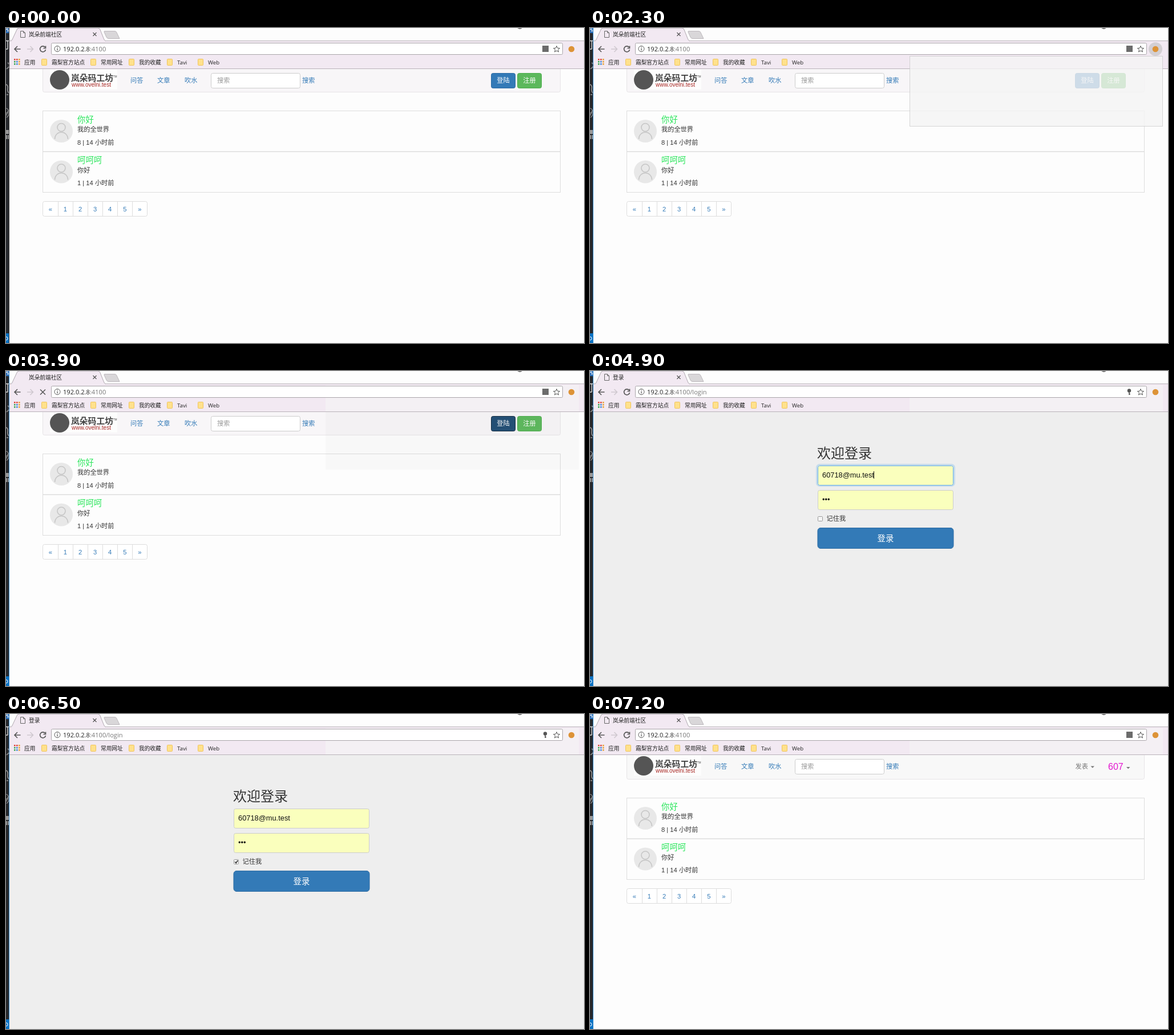
Animation of 1013 by 553 pixels, one loop 8 s. Source, as an HTML page:

```html
<!DOCTYPE html>
<html lang="zh">
<head>
<meta charset="utf-8">
<style>
  html, body { margin: 0; width: 100%; height: 100%; overflow: hidden; background: #fdfdfd; }
  svg { display: block; width: 1013px; height: 553px; }
  text { font-family: "Open Sans", "Noto Sans CJK SC", "Noto Sans CJK JP", sans-serif; white-space: pre; }
  #home text, #login text { font-family: "Liberation Sans", Arial, "Noto Sans CJK SC", "Noto Sans CJK JP", sans-serif; }
</style>
</head>
<body>
<svg id="stage" viewBox="0 0 1013 553"></svg>
<script>
const LINK = '#337ab7', INK = '#333', BAR = '#f2e9f2';
const text = (x, y, str, size = 11.2, fill = INK, more = '') =>
  `<text x="${x}" y="${y}" font-size="${size}" fill="${fill}" ${more}>${str}</text>`;
const rect = (x, y, w, h, fill, stroke = 'none', r = 0, more = '') =>
  `<rect x="${x}" y="${y}" width="${w}" height="${h}" rx="${r}" fill="${fill}" stroke="${stroke}" ${more}/>`;
const path = (d, stroke, width = 1, fill = 'none') =>
  `<path d="${d}" stroke="${stroke}" stroke-width="${width}" fill="${fill}"/>`;
const circle = (x, y, r, fill, stroke = 'none', more = '') =>
  `<circle cx="${x}" cy="${y}" r="${r}" fill="${fill}" stroke="${stroke}" ${more}/>`;
const group = (id, ...parts) => `<g id="${id}">${parts.join('')}</g>`;
const MID = 'text-anchor="middle"';

// Editor window peeking out on the left
const editorStrip = () => [
  rect(0, 0, 6, 553, '#26282c'),
  rect(0, 0, 5, 9, '#2d6fb8'), path('M0 2h4M2 5h3', '#fff', 1.5),
  path('M0 22.5h5M3 23v14M0 37h3', '#ddd', 1.3),
  path('M1 72l2-2a5 5 0 0 0 0-9', '#999', 1.5),
  path('M0 99q4 2 3 7t2 8M1 117h3', '#999', 1.5),
  path('M0 141q4 0 5 6t-4 10M0 149h5M0 154l4-9', '#999', 1.2),
  rect(0, 179, 5, 7, '#999'), rect(0, 188, 2, 7, '#999'), rect(3, 188, 2, 7, '#999'),
  rect(0, 536, 5, 17, '#0a72c4'), circle(0, 545, 3, 'none', '#fff'),
  rect(5, 0, 1, 553, '#444', 'none', 0, 'id="edge"')
].join('');

const folder = (x, name) => rect(x + .5, 54.5, 9, 11, '#ffe18c', '#efc45c', 1) + text(x + 18, 64, name, 9.7, '#222');
const appColors = ['#e0463c', '#e0463c', '#e8a33a', '#3aa655', '#4285d8', '#e8a33a', '#3aa655', '#4285d8', '#e8a33a'];

const browser = () => [
  rect(6, 0, 1007, 22, '#fdfdfd'),
  rect(6, 22, 1007, 49, BAR),
  rect(560, 25, 444, 46, '#f4f0f4', 'none', 0, 'id="barTint"'),
  path('M6 22.5H1013', '#b9b2b9'),
  path('M8 23Q11 22 12 18L19 3Q20 0 23 0H161Q164 0 165 3L171 18Q172 22 175 23', '#b0a8b0', 1, BAR),
  path('M173 5.5H191Q193 5.5 194 8L199 18.5H180Q177 18.5 176 16L172 7Q171.5 5.5 173 5.5Z', '#bdb8bd', 1, '#d9d7d9'),
  circle(900.5, -3, 5, '#777'),
  group('pageIcon', path('M25.5 5.5H30.5L33.5 8.5V16.5H25.5ZM30.5 5.5V8.5H33.5', '#666')),
  text(40, 15, '', 9.7, '#222', 'id="title"'),
  path('M152.5 8l6 6m0-6l-6 6', '#555', 1.2),
  path('M25.5 37H15.5M20 32l-5 5l5 5', '#555', 1.6),
  path('M37 37H47M42.5 32l5 5l-5 5', '#cfc8cf', 1.6),
  group('reload', path('M68.5 33.7A5 5 0 1 0 69.5 38M69.5 31.5V35.5H65.5', '#555', 1.6)),
  group('stop', path('M60 32.5l9 9m0-9l-9 9', '#555', 1.5)),
  rect(79.5, 26.5, 896, 20, '#fff', '#aaa5aa', 2),
  circle(90, 36.5, 5, 'none', '#555'), path('M90 35.5v4M90 33v1.3', '#555', 1.2),
  text(100, 40.5, '192.0.2.8<tspan id="port" fill="#777"></tspan>', 11.1, '#222'),
  group('translate', rect(940, 31, 11, 11, '#6b6b6b')),
  group('key', circle(945, 34.5, 3.2, '#555'), path('M945 36v6M945 40.5h2', '#555', 1.6)),
  path('M965 31.5l1.5 3.7l4 .3l-3 2.6l1 3.9l-3.5-2.1l-3.5 2.1l1-3.9l-3-2.6l4-.3Z', '#555'),
  circle(991, 37, 12, '#d3cfd3', 'none', 'id="press"'),
  circle(991, 37, 5.3, '#dd9337'),
  ...appColors.map((c, i) => rect(14 + i % 3 * 4, 54 + (i / 3 | 0) * 4, 2.6, 2.6, c)),
  text(32, 64, '应用', 9.7, '#222'),
  folder(62, '霜梨官方站点'), folder(148, '常用网址'), folder(215, '我的收藏'), folder(282, 'Tavi'), folder(336, 'Web'),
  path('M6 71.5H1013', '#b9b2b9')
].join('');

const post = (y, title, body, views) => [
  rect(64.5, y + .5, 907, 71.5, 'none', '#ddd'),
  circle(97, y + 36, 20, '#e8e8e8'),
  circle(97, y + 29.5, 7, 'none', '#c6c6c6', 'stroke-width="1.6"'),
  path(`M85.5 ${y + 50}C86 ${y + 34} 108 ${y + 34} 108.5 ${y + 50}`, '#c6c6c6', 1.6),
  text(125, y + 20.5, title, 14.4, '#2be65c'),
  text(125, y + 37, body),
  text(125, y + 59.5, views + ' | 14 小时前')
].join('');

const button = (id, x, name, fill, stroke) =>
  rect(x + .5, 79.5, 42, 26, fill, stroke, 3, `id="${id}"`) + text(x + 21.5, 96, name, 11.2, '#fff', MID + ' font-weight="500"');

const home = () => group('home',
  rect(6, 72, 1007, 481, '#fdfdfd'),
  rect(64.5, 69.5, 907, 43, '#f8f6f8', '#e7e4e7', 3, 'id="nav"'),
  rect(77, 73, 118, 35, '#fdfdfd'),
  circle(94, 91, 17, '#555'),
  text(114, 93, '岚朵码工坊', 14.8, '#444', 'font-weight="bold"'),
  text(188, 87, 'TM', 4.5, '#444'),
  text(115, 103, 'www.ovelni.test', 10, '#a82824'),
  text(218, 96, '问答', 11.2, LINK), text(265, 96, '文章', 11.2, LINK), text(313, 96, '吹水', 11.2, LINK),
  rect(359.5, 79.5, 156, 26, '#fff', '#ccc', 3),
  text(370, 96, '搜索', 11.2, '#999'), text(519, 95.5, '搜索', 11.2, LINK),
  group('guest', button('loginLink', 850, '登陆', LINK, '#2e6da4'), button('joinLink', 896, '注册', '#5cb85c', '#4cae4c')),
  group('member',
    text(850.5, 96, '发表', 11.2, '#777'), path('M877.5 91.5h6.5l-3.25 3.3Z', 'none', 0, '#777'),
    text(908, 98, '607', 16, '#e415cf'), path('M940 93h6.5l-3.25 3.3Z', 'none', 0, '#777')),
  group('list',
    post(145, '你好', '我的全世界', 8),
    post(216.5, '呵呵呵', '你好', 1),
    rect(64.5, 304.5, 183, 26, '#fff', '#ddd', 3),
    ...['«', 1, 2, 3, 4, 5, '»'].map((label, i) =>
      (i ? path(`M${65.3 + i * 26.1 | 0}.5 305v25`, '#ddd') : '') + text(77.8 + i * 26.1, 321.5, label, 11.2, LINK, MID))),
  rect(560, 72, 444, 101, '#888', 'none', 0, 'id="tint" opacity=".04"'));

const login = () => group('login',
  rect(6, 72, 1007, 481, '#eee'),
  text(398, 153, '欢迎登录', 24),
  rect(397.5, 164.5, 241, 37, 'none', '#66afe9', 5, 'id="glow" stroke-width="3" opacity=".3"'),
  rect(399.5, 166.5, 237, 34, '#faffbd', '#ccc', 3, 'id="mail"'),
  text(407, 187, '60718@mu.test', 12.85, '#111'),
  rect(497, 176, 1, 13, '#111', 'none', 0, 'id="caret"'),
  rect(399.5, 209.5, 237, 34, '#faffbd', '#ccc', 3),
  '<clipPath id="field"><rect x="407" y="210" width="222" height="33"/></clipPath>',
  '<g clip-path="url(#field)">', text(407, 229.5, '', 12.85, '#111', 'id="secret"'), '</g>',
  rect(399.5, 255.5, 8, 8, '#f5f5f5', '#999', 1, 'id="box"'),
  group('check', path('M401.3 259.5l1.8 2.2l3.2-4.7', '#333', 1.6)),
  text(414.5, 263, '记住我'),
  rect(398, 274, 240, 39, '#8fb4ea', 'none', 5, 'id="outline"'),
  rect(399, 275.5, 238, 36, LINK, '#2e6da4', 5, 'id="submit"'),
  text(518, 298.5, '登录', 14.4, '#fff', MID));

const popup = () => group('popup', rect(560.5, 49.5, 443, 123, '#f5f5f5', '#ccc'));

document.getElementById('stage').innerHTML = home() + login() + browser() + editorStrip() + popup();

const $ = id => document.getElementById(id);
const show = (id, on) => $(id).setAttribute('visibility', on ? 'inherit' : 'hidden');
const paint = (id, fill, stroke) => { $(id).setAttribute('fill', fill); $(id).setAttribute('stroke', stroke); };
const clamp = v => Math.max(0, Math.min(1, v));
const within = (t, from, to) => t >= from && t < to;

const blue = {
  idle: [LINK, '#2e6da4'],
  hover: ['#286090', '#204d74'],
  down: ['#204d74', '#122b40']
};

function draw(now) {
  const t = now % 8000, step = Math.floor(t / 100);
  const onLogin = within(t, 4000, 7200), member = t >= 7200;
  const loading = within(t, 3900, 4000) || within(t, 7100, 7200);

  // The window border turns blue once it gains focus
  paint('edge', t < 500 ? '#444' : '#3b8fd0', 'none');
  show('home', !onLogin);
  show('login', onLogin);
  show('guest', !member);
  show('member', member);
  $('list').setAttribute('transform', `translate(0 ${member ? 2 : 0})`);
  $('nav').setAttribute('height', member ? 45 : 43);
  paint('nav', member ? '#f8f8f8' : '#f8f6f8', '#e7e4e7');

  $('title').textContent = onLogin ? '登录' : '岚朵前端社区';
  $('port').textContent = onLogin ? ':4100/login' : ':4100';
  show('pageIcon', !loading);
  show('reload', !loading);
  show('stop', loading);
  show('translate', !onLogin);
  show('key', onLogin);

  // Extension popup fades in, then out in 100 ms steps
  show('press', within(t, 1800, 2900));
  $('popup').setAttribute('opacity', t < 2700 ? clamp((step - 19) / 5) : clamp((31 - step) / 5));
  show('barTint', t >= 3100);
  show('tint', within(t, 3100, 4000));

  paint('loginLink', ...(t < 3500 ? blue.idle : t < 3700 ? blue.hover : blue.down));

  const focused = t < 6300;
  show('glow', focused);
  paint('mail', '#faffbd', focused ? '#66afe9' : '#ccc');
  show('caret', onLogin && (t < 4400 || within(t, 4900, 5400) || within(t, 5900, 6300)));
  $('secret').textContent = '•'.repeat(t < 7100 ? 3 : 60);
  paint('box', within(t, 6300, 6500) ? '#ddd' : '#f5f5f5', '#999');
  show('check', onLogin && t >= 6500);

  const hover = within(t, 5300, 5900) || t >= 6600;
  paint('submit', ...(within(t, 6900, 7100) ? blue.down : hover ? blue.hover : blue.idle));
  show('outline', onLogin && t >= 6900);
}

const start = performance.now();
(function tick() {
  draw(performance.now() - start);
  requestAnimationFrame(tick);
})();
</script>
</body>
</html>
```
